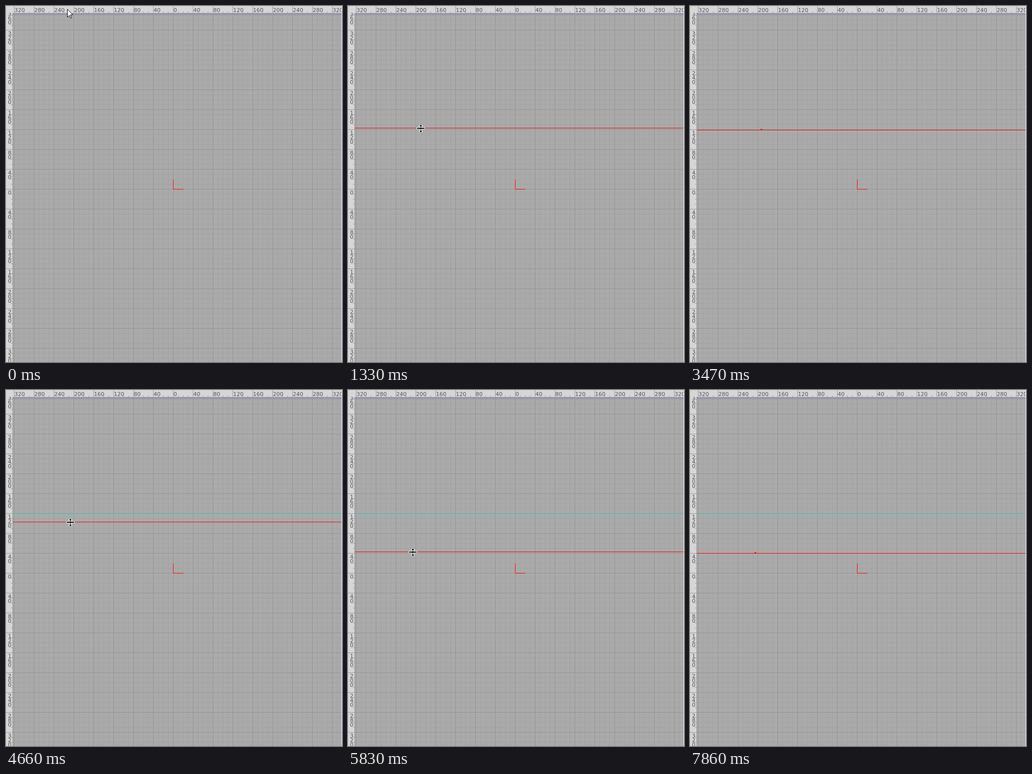
Recreate the animation shown at these times as an HTML page with a canvas. Size 676 by 716 pixels, loop 8000 ms.

```html
<!DOCTYPE html>
<html lang="en">
<head>
<meta charset="utf-8">
<title>Dragging guides from a ruler</title>
<style>
  html, body { margin: 0; width: 100%; height: 100%; overflow: hidden; }
  canvas { display: block; }
</style>
</head>
<body>
<canvas id="stage" width="676" height="716"></canvas>
<script>
const W = 676, H = 716, LOOP = 8000, STEP = 70;
const ORIGIN = { x: 336, y: 368 };
const RULER = 14;
const RED = '#ff0000', OLD_GUIDE = '#70c4be';
const ctx = document.getElementById('stage').getContext('2d');

// Both guides are pulled out of the top ruler, dropped, hovered and left. Times in ms.
const first = {
  grab: 530, pull: 680, stop: 1330, drop: 1710, hover: 2480, leave: 3020, gone: 3470,
  from: [141, 7], to: [146, 246], rest: [142, 249], exit: [123, 5], brake: 1.27,
};
const second = {
  grab: 4090, pull: 4090, stop: 5830, drop: 6090, hover: 6890, leave: 7270, gone: 7860,
  from: [127, 7], to: [130, 326], rest: [130, 328], exit: [3, 173], brake: 3.72,
};

// The pointer is redrawn once per STEP and slows down by the power given as brake.
function glide(t, start, end, [x0, y0], [x1, y1], brake = 1) {
  const elapsed = (Math.floor((t - start) / STEP) + 1) * STEP;
  const u = 1 - (1 - Math.min(1, elapsed / (end - start))) ** brake;
  return { x: Math.round(x0 + (x1 - x0) * u), y: Math.round(y0 + (y1 - y0) * u) };
}

function pointerAt(t) {
  if (t < 80) return { kind: 'arrow', x: 123, y: 6 };
  if (t < first.grab) return { kind: 'arrow', ...glide(t, 80, 300, [123, 6], [141, 6]) };
  const g = t < second.grab ? first : second;
  const [x, y] = g.rest;
  if (t < g.pull) return { kind: 'resize', x: g.from[0], y: g.from[1] };
  if (t < g.drop) return { kind: 'resize', ...glide(t, g.pull, g.stop, g.from, g.to, g.brake) };
  if (t < g.hover) return { kind: 'resize', x, y: y + 1 };
  if (t < g.leave) return { kind: 'move', x, y };
  if (t < g.gone) return { kind: 'arrow', ...glide(t, g.leave, g.gone, g.rest, g.exit) };
  return { kind: 'none', x, y };
}

function rect(color, x, y, w, h) {
  ctx.fillStyle = color;
  ctx.fillRect(x, y, w, h);
}

function outlined(points, stroke) {
  ctx.beginPath();
  for (const [x, y] of points) ctx.lineTo(x, y);
  ctx.closePath();
  ctx.fillStyle = '#fff';
  ctx.fill();
  ctx.strokeStyle = stroke;
  ctx.stroke();
}

function drawGrid() {
  rect('#aaaaaa', 0, 0, W, H);
  for (const [gap, color] of [[10, '#a2a2a2'], [40, '#949494']]) {
    for (let x = ORIGIN.x % gap; x < W; x += gap) rect(color, x, RULER, 1, H);
    for (let y = ORIGIN.y % gap; y < H; y += gap) rect(color, RULER, y, W, 1);
  }
}

function drawRulers() {
  const paper = '#d6d6d6', tick = '#999999', ink = '#555555';
  ctx.font = '11px "DejaVu Sans", sans-serif';

  rect(paper, 0, 0, RULER - 1, H);
  rect(tick, RULER - 1, RULER, 1, H);
  for (let y = ORIGIN.y % 10; y < H; y += 10) {
    const major = (y - ORIGIN.y) % 40 === 0;
    rect(tick, major ? 0 : 10, y, major ? 13 : 3, 1);
    if (!major) continue;
    ctx.fillStyle = ink;
    [...String(Math.abs(y - ORIGIN.y))].forEach((digit, i) => ctx.fillText(digit, 4, y + 11 + i * 9));
  }

  rect(paper, 0, 0, W, RULER);
  rect(tick, RULER - 1, RULER, W, 1);
  rect('#9896b6', RULER, RULER + 1, W, 3);
  for (let x = 16; x < W; x += 10) {
    const major = (x - ORIGIN.x) % 40 === 0;
    rect(tick, x, major ? 0 : 11, 1, major ? 14 : 3);
    if (!major) continue;
    ctx.fillStyle = ink;
    ctx.fillText(Math.abs(x - ORIGIN.x), x + 1, 12);
  }
  rect('#f0f0f0', W - 1, 0, 1, H);
}

function drawGuide(g, t, pointer) {
  if (t < g.pull) return;
  const [x, restY] = g.rest, width = W - 1 - RULER;
  if (g === first && t >= second.pull) {
    rect(OLD_GUIDE, RULER, restY, width, 2);
    return;
  }
  rect(RED, RULER, t < g.drop ? pointer.y - 1 : restY, width, 1);
  if (t >= g.leave) rect(RED, x, restY - 2, 3, 2);
}

const cursors = {
  none() {},
  arrow() {
    outlined([[.5, .5], [.5, 16.5], [4.5, 12.8], [7, 18.5], [9.3, 17.5], [6.8, 11.8], [11.5, 11.5]], '#000');
  },
  resize() {
    rect('#fff', -8, -2, 17, 4);
    rect('#fff', -1, -7, 3, 15);
    rect('#fff', -3, -6, 7, 3);
    rect('#fff', -3, 4, 7, 3);
    rect('#000', -7, -1, 15, 2);
    for (let i = 0; i < 3; i++) {
      rect('#000', -i, i - 7, 2 * i + 1, 1);
      rect('#000', -i, 7 - i, 2 * i + 1, 1);
    }
    rect('#000', 0, -7, 1, 15);
  },
  move() {
    ctx.translate(.5, .5);
    const arm = [[-1, -1], [-1, -7], [-4, -7], [0, -11], [4, -7], [1, -7]];
    const outline = [];
    let turned = arm;
    for (let i = 0; i < 4; i++) {
      outline.push(...turned);
      turned = turned.map(([x, y]) => [-y, x]);
    }
    outlined(outline, '#202030');
  },
};

function draw(t) {
  const pointer = pointerAt(t);
  drawGrid();
  drawGuide(first, t, pointer);
  drawGuide(second, t, pointer);
  rect(RED, ORIGIN.x, ORIGIN.y - 19, 1, 20);
  rect(RED, ORIGIN.x, ORIGIN.y, 21, 1);
  drawRulers();
  ctx.save();
  ctx.translate(pointer.x, pointer.y);
  cursors[pointer.kind]();
  ctx.restore();
}

function frame() {
  draw(performance.now() % LOOP);
  requestAnimationFrame(frame);
}
frame();
</script>
</body>
</html>
```
